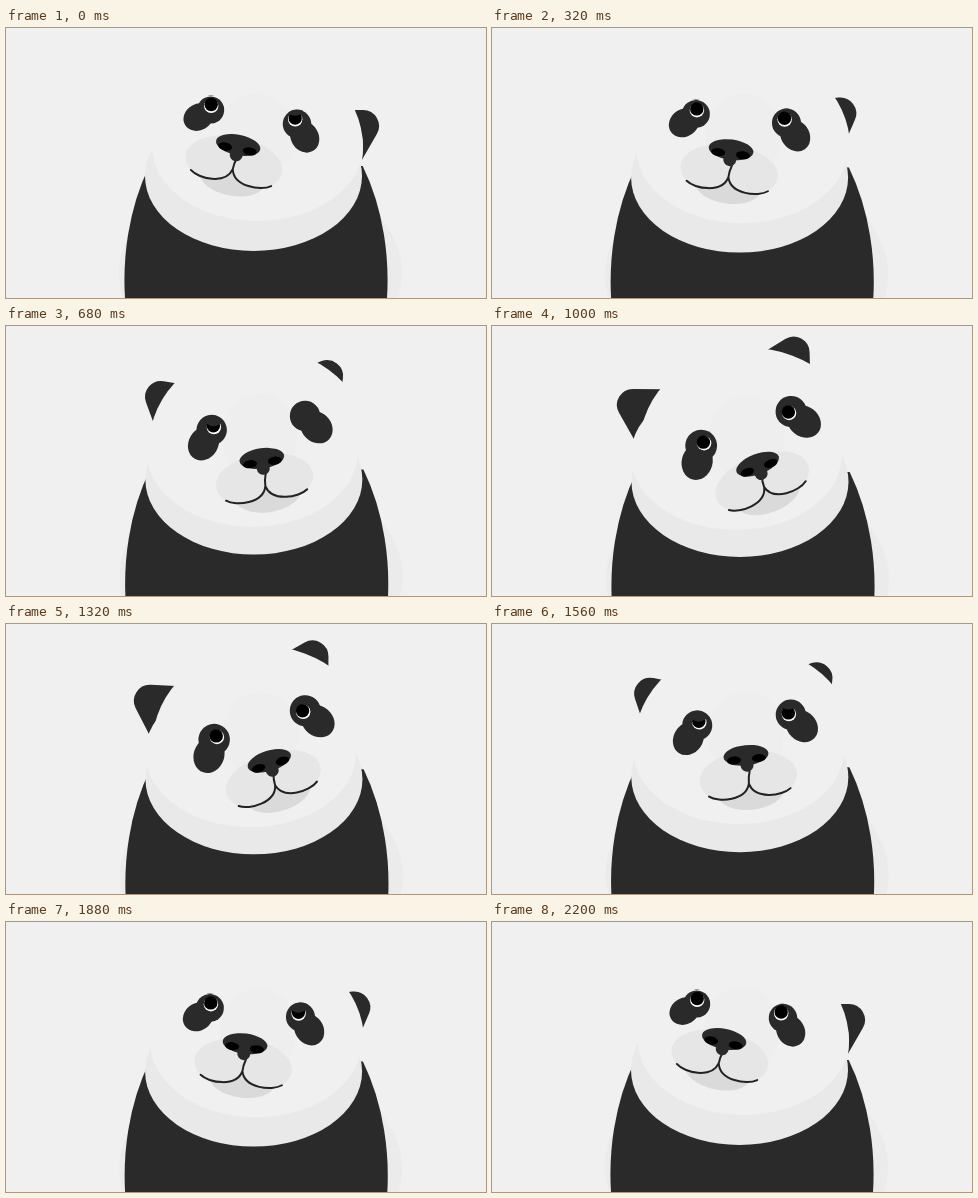
These frames come from a looping animation (480 px wide and 270 px high, 2240 ms). An HTML page:

```html
<!DOCTYPE html>
<html lang="en">
<head>
<meta charset="utf-8">
<title>Panda</title>
<style>
  html, body { margin: 0; width: 100%; height: 100%; overflow: hidden; background: #f0f0f0; }
  svg { display: block; width: 100%; height: 100%; }
  .dark { fill: #2a2a2a; }
  .face { fill: #f0f0f0; }
</style>
</head>
<body>
<svg viewBox="0 0 480 270">
  <defs>
    <clipPath id="socket"><circle r="14.5"/></clipPath>
    <path id="ear" class="dark" d="M8-13.86A16 16 0 0 1 8 13.86L-18 28.9V-28.9Z"/>
    <g id="patch" class="dark">
      <circle r="15"/>
      <ellipse cy="15.7" rx="14.6" ry="17.3"/>
    </g>
  </defs>

  <ellipse id="back" rx="141.5" ry="105" fill="#ebebeb"/>
  <use id="earL" href="#ear"/>
  <use id="earR" href="#ear"/>
  <ellipse id="head" class="face" rx="110" ry="98"/>
  <path id="body" class="dark" d="M-106.7-114H106.7A131.5 195 0 0 1 130 30H-130A131.5 195 0 0 1-106.7-114Z"/>
  <ellipse id="chin" rx="108.5" ry="75" fill="#e9e9e9"/>
  <ellipse id="face" class="face" rx="105.5" ry="74"/>
  <ellipse id="bridge" rx="38" ry="42" fill="#eee"/>

  <g id="muzzle">
    <ellipse cx="1" rx="33" ry="17.5" fill="#dadada"/>
    <path fill="#e6e6e6" d="M-41 0C-32 7-4 8 0-9C4 8 32 7 41 0A49 27 0 1 0-41 0Z"/>
    <path fill="none" stroke="#222" stroke-width="2" stroke-linecap="round"
      d="M-41 0C-32 7-4 8 0-9C4 8 32 7 41 0M0-9Q0-15 2-21"/>
  </g>
  <g id="nose">
    <ellipse class="dark" cy="-1" rx="22.5" ry="10.2"/>
    <rect class="dark" x="-6.5" width="13" height="15.5" rx="6.5"/>
    <ellipse cx="-12.5" cy="3" rx="7" ry="4"/>
    <ellipse cx="12.5" cy="3" rx="7" ry="4"/>
  </g>

  <use id="patchL" href="#patch"/>
  <use id="patchR" href="#patch"/>
  <g id="eyeL" clip-path="url(#socket)">
    <g class="pupil"><circle class="white" r="7.2" fill="#fff"/><circle r="6.7"/></g>
    <circle class="lid dark" r="9.5"/>
  </g>
  <g id="eyeR" clip-path="url(#socket)">
    <g class="pupil"><circle class="white" r="7.2" fill="#fff"/><circle r="6.7"/></g>
    <circle class="lid dark" r="9.5"/>
  </g>
</svg>
<script>
  const LOOP = 2240, STEP = 40, TURN = 27;

  // Each part: x, y, angle and scale as [a, b, c] in a + b*s + c*s², s = head turn from 0 to 1
  const tilt = [11.3, -16.6, -15.9];
  const leftEye = [[204.7, -6.2, 10.9], [82, 15.2, 23.3]];
  const rightEye = [[291, 19.5, -11.4], [96, -3.7, -7]];
  const parts = {
    back: [[254.5, 1, 0], [245, 8, 0]],
    body: [[250, 1, 0], [252, 8, 0]],
    earL: [[208, -95, 27.4], [62, 2.5, 14.9], [-118, -32, 0]],
    earR: [[357, -40.1, -16.3], [98, -59.7, -12.8], [-30, -32, 0]],
    head: [[247, 4, 7], [119, 1, 0]],
    chin: [[247.5, 0.5, 0], [148, 8, 0]],
    face: [[251.5, -7.5, 0], [119, 11, 0]],
    bridge: [[251, 4, 0], [107, 4, 0]],
    muzzle: [[225, 51, 0], [150, 45, -25.5], tilt],
    nose: [[232, 34.4, 0], [118, 24, -2.7], tilt],
    patchL: [...leftEye, [60, -29.1, -17.7], [0.9, 0.16, 0]],
    patchR: [...rightEye, [-31, -19.4, -2], [0.95, 0.09, 0]],
    eyeL: leftEye,
    eyeR: rightEye
  };

  // Pupil offsets as above; blinks: [start, duration] in ms
  const eyes = [
    { id: "eyeL", x: [0.5, 1.7, 0], y: [-5.5, 2, 0], blinks: [[620, 240], [1500, 240]] },
    { id: "eyeR", x: [-1.8, -1, 0], y: [-6, 6.5, 0], blinks: [[-40, 200], [520, 360], [1460, 560]] }
  ];

  const $ = id => document.getElementById(id);
  const poly = ([a, b, c], s) => a + b * s + c * s * s;
  const move = (el, x, y, r = 0, k = 1) =>
    el.setAttribute("transform",
      `translate(${x.toFixed(2)} ${y.toFixed(2)}) rotate(${r.toFixed(2)}) scale(${k.toFixed(3)})`);

  function closure(t, blinks) {
    for (const [start, length] of blinks) {
      const u = (t - start) / length;
      if (u > 0 && u < 1) return Math.sin(Math.PI * u) ** 2;
    }
    return 0;
  }

  function draw(t) {
    const n = Math.floor(t / STEP);
    const p = Math.min(n, 2 * TURN + 1 - n) / TURN;
    const s = (1 - Math.cos(Math.PI * p)) / 2;

    for (const id in parts) move($(id), ...parts[id].map(k => poly(k, s)));

    const glint = s * 0.6;
    for (const { id, x, y, blinks } of eyes) {
      const eye = $(id), px = poly(x, s), py = poly(y, s);
      move(eye.querySelector(".pupil"), px, py);
      move(eye.querySelector(".white"), 1.3 * Math.sin(glint), 1.3 * Math.cos(glint));
      move(eye.querySelector(".lid"), px, py - 18 * (1 - closure(n * STEP, blinks)));
    }
  }

  const begin = performance.now();
  function tick() {
    draw((performance.now() - begin) % LOOP);
    requestAnimationFrame(tick);
  }
  tick();
</script>
</body>
</html>
```
